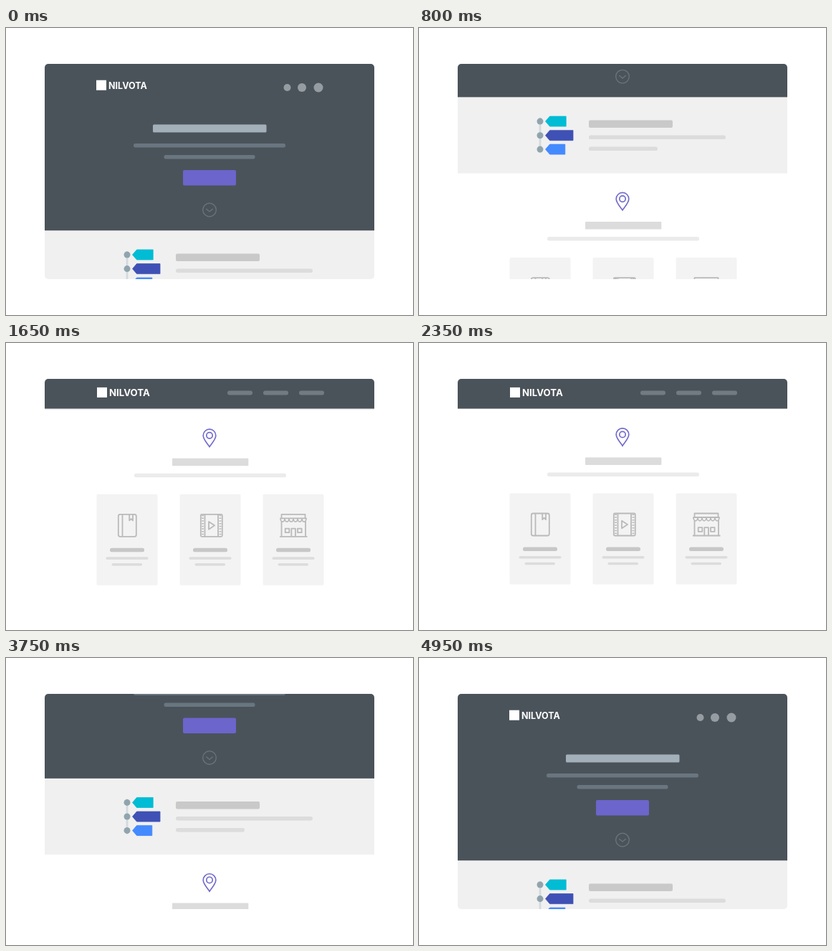
Recreate the animation shown at these times as an HTML page. Size 568 by 400 pixels, loop 5 s.

```html
<!DOCTYPE html>
<html lang="en">
<head>
<meta charset="utf-8">
<title>Landing page scroll</title>
<style>
  html, body { margin: 0; width: 100%; height: 100%; overflow: hidden; background: #fff; }
  svg { display: block; }
  text { font-family: Inter, sans-serif; font-weight: 700; fill: #fff; }
  .icon { fill: none; stroke: #bababa; stroke-width: 1.8; stroke-linejoin: round; }
</style>
</head>
<body>
<svg width="568" height="400" viewBox="0 0 568 400">
  <clipPath id="window"><rect x="54" y="50" width="460" height="300" rx="5"/></clipPath>
  <g clip-path="url(#window)">
    <g id="page"></g>
    <g id="header"></g>
  </g>
</svg>
<script>
const LOOP = 5000, SCROLL = 296.5, HEADER = 42;
const DARK = '#4b535a';
const page = document.getElementById('page');
const header = document.getElementById('header');

const bar = (x1, y1, x2, y2, fill, r = 0) =>
  `<rect x="${x1}" y="${y1}" width="${x2 - x1}" height="${y2 - y1}" rx="${r}" fill="${fill}"/>`;
const dot = (x, y, r, fill) => `<circle cx="${x}" cy="${y}" r="${r}" fill="${fill}"/>`;
const brand = (x, y, size) =>
  bar(x, y - 12.5, x + 14, y + 1.5, '#fff') + `<text x="${x + 17}" y="${y}" font-size="${size}">NILVOTA</text>`;

const hero = bar(54, 0, 514, 282.5, DARK) + brand(126, 85.2, 12.5)
  + [392.5, 413, 436].map((x, i) => dot(x, 83, [5, 6, 6.5][i], '#969da2')).join('')
  + bar(205, 134.5, 363.5, 145.5, '#a3b0b9', 1.5)
  + bar(178, 161, 390, 166.5, '#697680', 2.5)
  + bar(220.5, 177, 347.5, 182.5, '#697680', 2.5)
  + bar(247, 198, 321, 219.5, '#6c65cb', 2)
  + '<g fill="none" stroke="#6b747b" stroke-width="1.3"><circle cx="284" cy="253.5" r="9.3"/><path d="M279.3 252l4.7 4 4.7-4"/></g>';

const tag = (y, right, fill) => dot(169, y, 4.5, '#90a4ae')
  + `<path d="M176.5 ${y}l6-7H${right}v14H182.5z" fill="${fill}" stroke="${fill}" stroke-linejoin="round" stroke-width=".8"/>`;

const timeline = bar(54, 282.5, 514, 388.5, '#f0f0f0')
  + bar(167.6, 311, 170.4, 360, '#d3dadd')
  + tag(316, 205.2, '#00bcd4') + tag(335.6, 215, '#3f51b5') + tag(355, 203.8, '#448aff')
  + bar(237, 314.5, 354, 325, '#c9c9c9', 2)
  + bar(237, 335.5, 428, 341, '#dcdcdc', 2.7)
  + bar(237, 351.5, 333, 357, '#dcdcdc', 2.7);

// Icons are drawn around the centre of their card.
const sprockets = x => `<path d="M${x} -14.5v29" stroke-width="3" stroke-dasharray="1.5 2.2"/>`;
const icons = [
  '<rect x="-12.2" y="-15.5" width="25" height="31" rx="2.5"/><path d="M-6.5-15.5v31M3.2-15.5v8.6l2.4-2.4 2.4 2.4v-8.6"/>',
  '<rect x="-13.2" y="-15.5" width="30" height="31" rx="1.5"/><path d="M-7.5-15.5v31M11-15.5v31M-2-5.3l8 5.3-8 5.3z"/>'
    + sprockets(-10.4) + sprockets(14),
  '<path d="M-16.5-10v-5.5h33v5.5M-18.5-10h37M-16.5-6v21.5M17-6v21.5M-19 15.5H19.5'
    + 'M-18-10a3 4.8 0 006 0a3 4.8 0 006 0a3 4.8 0 006 0a3 4.8 0 006 0a3 4.8 0 006 0a3 4.8 0 006 0'
    + 'M-11.3 4.2h5.6v5.6h-5.6zM6 4.2h5.6v5.6H6zM-2.7 15.5V4.2h5.6v11.3"/>'
];

const card = (icon, i) => {
  const x = 169 + 116 * i;
  return bar(x - 42.5, 209.5, x + 42.5, 336.5, '#f3f3f3', 2)
    + `<g class="icon" transform="translate(${x} 253)">${icon}</g>`
    + bar(x - 24, 284.5, x + 24, 290, '#c7c7c7', 2.5)
    + bar(x - 29.5, 297, x + 29.5, 300.5, '#dcdcdc', 1.7)
    + bar(x - 21.5, 305.7, x + 21, 309.2, '#dcdcdc', 1.7);
};

const features = `<g transform="translate(0 ${SCROLL})">`
  + '<g fill="none" stroke="#736ccb" stroke-width="1.7"><path d="M284 143.3C281 138.5 275.2 133 275.2 127.6a8.8 8.8 0 0117.6 0C292.8 133 287 138.5 284 143.3z"/><circle cx="284" cy="127.5" r="4.2"/></g>'
  + bar(232, 159.5, 338.3, 170, '#dcdcdc', .8)
  + bar(179, 180.5, 391, 186, '#ebebeb', 2.5)
  + icons.map(card).join('') + '</g>';

page.innerHTML = hero + timeline + features;
header.innerHTML = bar(54, 0, 514, 91.5, DARK) + brand(127, 74.4, 13.2)
  + [309, 359, 409].map(x => bar(x, 66.5, x + 35, 72.5, '#737b82', 3)).join('');

const clamp = x => Math.min(1, Math.max(0, x));
const easeOut = x => 1 - (1 - clamp(x)) ** 2;

// Cubic Bezier easing through (a, 0) and (b, 1).
function ease(x, a, b) {
  x = clamp(x);
  if (x === 0 || x === 1) return x;
  let lo = 0, hi = 1;
  for (let i = 0; i < 24; i++) {
    const s = (lo + hi) / 2, q = 1 - s;
    if (3 * a * s * q * q + 3 * b * s * s * q + s ** 3 < x) lo = s; else hi = s;
  }
  return lo * lo * (3 - 2 * lo);
}

function draw(now) {
  const t = now % LOOP;
  const scrolled = ease(t / 1750, .113, .523) - ease((t - 3000) / 1700, .102, .518);
  const shown = easeOut((t - 1010) / 400) - easeOut((t - 3000) / 350);
  page.setAttribute('transform', `translate(0 ${-SCROLL * scrolled})`);
  header.setAttribute('transform', `translate(0 ${-HEADER * (1 - shown)})`);
  header.style.display = shown > 0 ? '' : 'none';
  requestAnimationFrame(() => draw(performance.now()));
}
draw(0);
</script>
</body>
</html>
```
